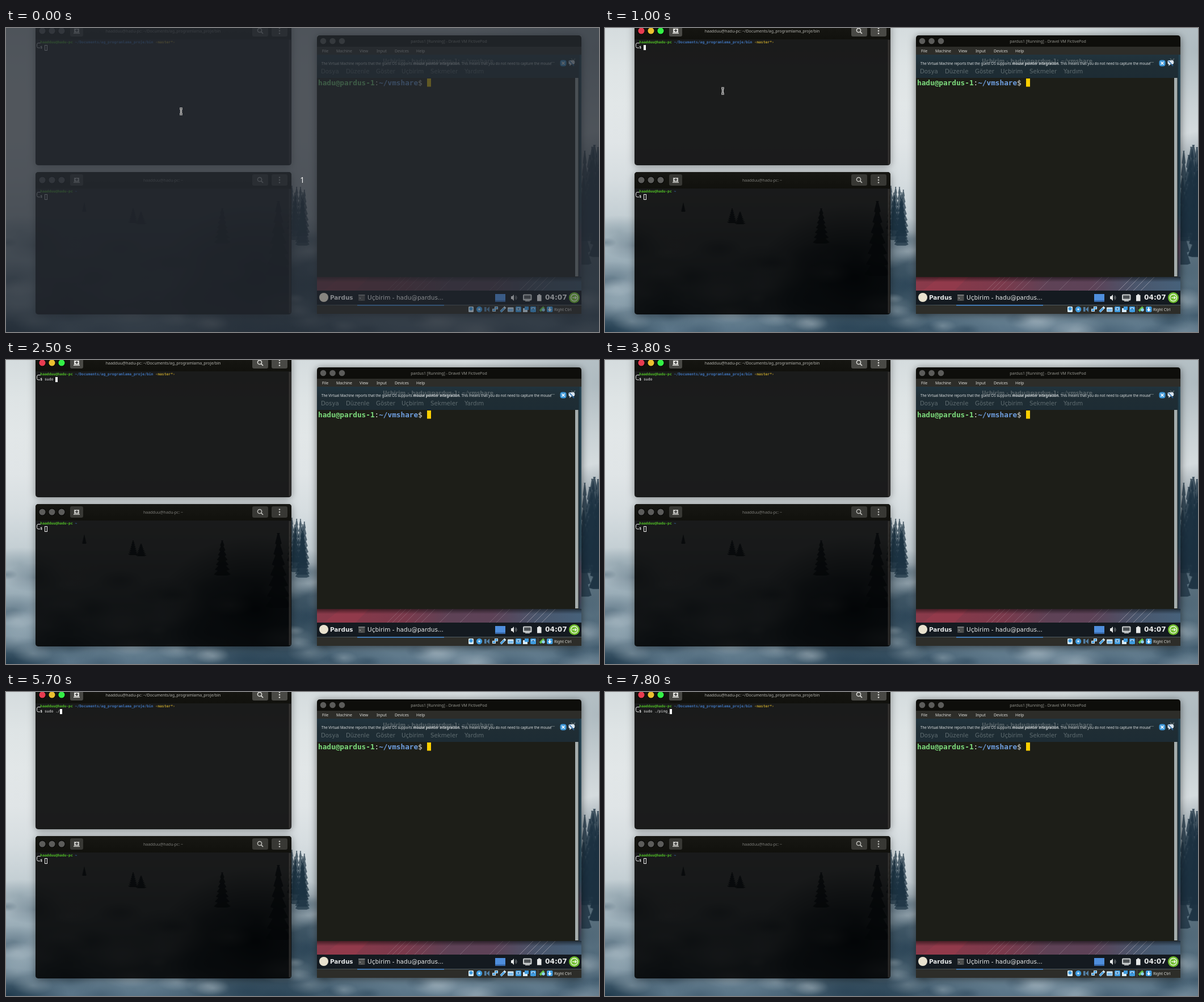
Animation, 1045 px wide and 536 px high, one loop 8000 ms. Source, as an HTML page with a canvas:

```html
<!DOCTYPE html>
<html lang="tr">
<head>
<meta charset="utf-8">
<title>Terminal session</title>
<style>
html, body { margin: 0; width: 100%; height: 100%; overflow: hidden; background: #24394a; }
canvas { display: block; }
</style>
</head>
<body>
<canvas id="stage" width="1045" height="536"></canvas>
<script>
const W = 1045, H = 536, LOOP = 8000;
const SANS = '"Noto Sans", sans-serif';
const GUEST = '"DejaVu Sans", sans-serif';
const MONO = '"DejaVu Sans Mono", monospace';
const CELL = 3.83, TERM_FONT = `${CELL / 0.602}px ${MONO}`;
const USER = 'haadduu@hadu-pc';

const stage = document.getElementById('stage').getContext('2d');
let g = stage;

function rect(x, y, w, h, fill) {
  g.fillStyle = fill;
  g.fillRect(x, y, w, h);
}

function round(x, y, w, h, r, fill) {
  g.beginPath();
  g.roundRect(x, y, w, h, r);
  g.fillStyle = fill;
  g.fill();
}

function disc(x, y, r, fill) {
  g.beginPath();
  g.arc(x, y, r, 0, 7);
  g.fillStyle = fill;
  g.fill();
}

function line(points, color, width = 1) {
  g.beginPath();
  points.forEach(([x, y]) => g.lineTo(x, y));
  g.strokeStyle = color;
  g.lineWidth = width;
  g.stroke();
}

function poly(points, fill) {
  g.beginPath();
  points.forEach(([x, y]) => g.lineTo(x, y));
  g.fillStyle = fill;
  g.fill();
}

// Writes text and returns the x where it ends.
function text(s, x, y, font, fill, align = 'left') {
  g.font = font;
  g.fillStyle = fill;
  g.textAlign = align;
  g.fillText(s, x, y);
  return x + g.measureText(s).width;
}

function gradient(x0, y0, x1, y1, ...colors) {
  const grad = g.createLinearGradient(x0, y0, x1, y1);
  colors.forEach((c, i) => grad.addColorStop(i / (colors.length - 1), c));
  return grad;
}

function blob(x, y, rx, ry, rgb, a) {
  g.save();
  g.translate(x, y);
  g.scale(rx, ry);
  const grad = g.createRadialGradient(0, 0, 0, 0, 0, 1);
  grad.addColorStop(0, `rgba(${rgb},${a})`);
  grad.addColorStop(1, `rgba(${rgb},0)`);
  rect(-1, -1, 2, 2, grad);
  g.restore();
}

function tree(x, top, h, w, fill) {
  const side = [];
  for (let i = 0; i <= 7; i++) {
    const y = top + h * i / 7, half = w * (i + 1) / 16;
    side.push([half, y], [half * 0.6, y + 2]);
  }
  poly([[x, top], ...side.map(([d, y]) => [x + d, y]),
    ...side.reverse().map(([d, y]) => [x - d, y])], fill);
}

// Shadow only outside the window, so translucent glass stays clear.
function shadow(x, y, w, h, r, strength) {
  g.save();
  g.beginPath();
  g.rect(0, 0, W, H);
  g.roundRect(x, y, w, h, r);
  g.clip('evenodd');
  g.shadowColor = `rgba(0,0,0,${strength})`;
  g.shadowBlur = 14;
  g.shadowOffsetY = 2;
  round(x, y, w, h, r, '#000');
  g.restore();
}

function landscape() {
  rect(0, 0, W, H, gradient(0, 0, 0, H, '#d5dcde', '#dee4e5', '#e2e7e8', '#e0e5e7',
    '#d6dde0', '#c3ced3', '#9fb1bb', '#7d94a2', '#587386'));
  blob(1045, 40, 240, 190, '130,148,158', 0.5);
  blob(1065, 330, 150, 150, '24,48,64', 1);
  blob(1045, 470, 120, 100, '62,88,106', 0.7);
  blob(440, 440, 170, 130, '14,34,48', 0.95);
  blob(530, 450, 60, 90, '40,66,84', 0.7);
  blob(25, 360, 70, 30, '120,142,154', 0.5);
  blob(0, 536, 110, 50, '24,50,68', 0.9);
  blob(470, 536, 230, 46, '34,60,78', 0.75);
  // drifting mist over the valley
  let seed = 11;
  const random = () => (seed = seed * 16807 % 2147483647) / 2147483647;
  for (let i = 0; i < 110; i++) {
    const x = random() * W, y = 375 + random() * 165, r = 12 + random() * 30;
    blob(x, y, r * 1.5, r * 0.7, i % 2 ? '205,217,223' : '34,60,80', 0.28);
  }
  for (let i = 0; i < 9; i++) {
    tree(1016 + random() * 32, 205 + random() * 70, 150, 26 + random() * 16, 'rgba(27,49,65,.75)');
    tree(502 + random() * 26, 278 + random() * 30, 75, 16 + random() * 12, 'rgba(28,50,66,.7)');
  }
  [[480, 305, 130, 46], [381, 318, 60, 30], [224, 318, 24, 18], [238, 324, 20, 20], [138, 308, 14, 9]]
    .forEach(([x, y, h, w]) => tree(x, y, h, w, 'rgba(25,43,56,.75)'));
}

function terminalFrame(y) {
  shadow(52, y, 451, 251, 5, 0.4);
  round(52, y, 451, 251, 5, 'rgba(0,0,0,.88)');
  round(52, y, 451, 29, [5, 5, 0, 0], gradient(0, y, 0, y + 29, '#171713', '#11110d'));
  rect(498.5, y + 30, 3.5, 219, 'rgba(74,70,66,.5)');
}

function terminalHeader(y, title, active) {
  const cy = y + 14;
  const face = active ? '#494945' : '#383834', ink = active ? '#dededa' : '#c0c0bc';
  const lights = active ? ['#e83c50', '#ecc030', '#34f046'] : ['#5c5c5a', '#5c5c5a', '#5c5c5a'];
  lights.forEach((c, i) => {
    disc(64 + 17 * i, cy, 6.6, '#050505');
    disc(64 + 17 * i, cy, 5.6, c);
  });
  text(title, 277, cy + 2.5, '7px ' + SANS, active ? '#b2b2ad' : '#7c7c78', 'center');

  round(113, cy - 10, 23, 20, 3, face);
  round(434, cy - 10, 28, 20, 3, face);
  round(468, cy - 10, 28, 20, 3, face);
  // new tab, search and menu
  rect(120, cy - 4, 9, 7, ink);
  rect(119, cy + 3.5, 11, 1.5, ink);
  rect(124, cy - 3, 1.4, 5, '#333');
  rect(122, cy - 1.2, 5, 1.4, '#333');
  g.beginPath();
  g.arc(447, cy - 1, 3.6, 0, 7);
  g.strokeStyle = ink;
  g.lineWidth = 1.5;
  g.stroke();
  line([[449.6, cy + 1.6], [453, cy + 5]], ink, 1.7);
  [-4.5, 0, 4.5].forEach(d => disc(482, cy + d, 1.3, ink));
}

function terminalPrompt(y, path, branch, typed, active, lit) {
  const base = y + 36.3, left = 68 - 2 * CELL, bold = 'bold ' + TERM_FONT;
  g.beginPath();
  g.moveTo(61, y + 35.5);
  g.lineTo(57, y + 35.5);
  g.quadraticCurveTo(54.5, y + 35.5, 54.5, y + 38);
  g.lineTo(54.5, y + 41.5);
  g.quadraticCurveTo(54.5, y + 44, 57, y + 44);
  g.lineTo(60, y + 44);
  g.strokeStyle = '#e4e4e4';
  g.lineWidth = 1;
  g.stroke();
  text(USER, left, base, bold, '#50bd26');
  text(path, left + CELL * 16, base, bold, '#3f73b8');
  text(branch, left + CELL * (17 + path.length), base, bold, '#b89a2a');
  text('$', left, base + 9, bold, '#eee');
  text(typed, 68, base + 9, TERM_FONT, '#f2f2f2');

  const cx = 68 + Math.round(typed.length * CELL);
  if (!active) {
    g.strokeStyle = '#eee';
    g.strokeRect(cx + 0.5, y + 39.5, 4, 9);
  } else if (lit) {
    rect(cx, y + 39, 4, 9, '#fff');
  }
}

function guestDesktop() {
  rect(548, 47, 466, 416, gradient(548, 47, 548, 463, '#2b4d5e', '#2c4a59', '#344f60'));
  rect(548, 439, 466, 24, gradient(548, 0, 1014, 0, '#8a3a4a', '#84394a', '#7a3a4c',
    '#5e4256', '#5d4257', '#4a566c', '#46617a'));
  rect(1009, 330, 5, 110, gradient(0, 330, 0, 440, '#2f4c5c', '#5a4456', '#3c5064'));
  poly([[590, 439], [640, 439], [616, 463], [560, 463]], 'rgba(190,60,80,.2)');
  g.save();
  g.beginPath();
  g.rect(548, 439, 466, 24);
  g.clip();
  for (const x of [672, 681, 690, 704, 720, 732, 764, 800, 852, 864, 905, 918, 931, 944]) {
    line([[x, 463], [x + 24, 439]], `rgba(220,210,220,${x > 890 ? 0.45 : 0.22})`);
  }
  g.restore();
  rect(548, 439, 466, 9, gradient(0, 439, 0, 448, 'rgba(0,0,0,.5)', 'rgba(0,0,0,0)'));
  rect(1009, 47, 5, 392, gradient(1009, 0, 1014, 0, 'rgba(0,0,0,.4)', 'rgba(0,0,0,0)'));
  rect(548, 47, 461, 41, gradient(0, 47, 0, 88, '#21343e', '#1f2d34', '#1d2c34'));
  rect(548, 88, 461, 351, '#1d1e18');
  rect(1003, 88, 5.5, 350, '#a5adad');
}

function guestWindow() {
  const dim = '#5f6c70';
  text('Uçbirim - hadu@pardus-1: ~/vmshare', 761.5, 61, 'bold 9.26px ' + GUEST, '#566267', 'center');
  [['Dosya', 555], ['Düzenle', 599], ['Göster', 652], ['Uçbirim', 697], ['Sekmeler', 748], ['Yardım', 808]]
    .forEach(([s, x]) => text(s, x, 80.3, '10.2px ' + GUEST, dim));
  line([[960, 60.5], [967, 60.5]], dim);
  line([[996, 54], [1003, 61]], dim, 1.4);
  line([[1003, 54], [996, 61]], dim, 1.4);

  const note = '6.18px ' + SANS, ink = '#dde1e2';
  let x = text('The Virtual Machine reports that the guest OS supports ', 556, 64.8, note, ink);
  x = text('mouse pointer integration', x, 64.8, 'bold ' + note, ink);
  text('. This means that you do not need to capture the mouse', x, 64.8, note, ink);
  round(976.5, 56.5, 11, 11, 4, '#3d97d8');
  line([[979.5, 59.5], [984.5, 64.5]], '#fff', 1.5);
  line([[984.5, 59.5], [979.5, 64.5]], '#fff', 1.5);
  round(991.5, 57, 10.5, 7, 2, '#d9e4ee');
  poly([[994, 63], [998, 63], [993, 67]], '#d9e4ee');
  line([[993, 58], [1001, 67]], '#2d6fae', 1.5);

  const font = `bold ${7.66 / 0.602}px ${MONO}`;
  x = text('hadu@pardus-1', 550, 100.7, font, '#7ddc7d');
  x = text(':', x, 100.7, `12.72px ${MONO}`, '#e0e0da');
  x = text('~/vmshare', x, 100.7, font, '#6f9fe0');
  text('$', x, 100.7, `12.72px ${MONO}`, '#e0e0da');
  rect(742, 89, 7, 14.5, '#fdd000');
}

function taskbar() {
  const ink = '#e6e8e8';
  rect(548, 463, 466, 25, '#141a20');
  disc(560, 475, 8, '#e9e2cf');
  text('Pardus', 571, 478.8, 'bold 10.4px ' + GUEST, ink);
  round(621, 470, 11.5, 11, 1, '#4b4d4d');
  rect(621, 470, 11.5, 2, '#77797a');
  text('>_', 622.5, 477.5, `5px ${MONO}`, ink);
  text('Uçbirim - hadu@pardus...', 637, 478.8, '10.5px ' + GUEST, ink);
  rect(862, 469, 18, 13.5, '#4f8edc');
  rect(862, 480, 18, 2.5, '#3a6fb4');
  poly([[890, 473], [892, 473], [895, 470], [895, 481], [892, 478], [890, 478]], ink);
  [3, 5].forEach(r => {
    g.beginPath();
    g.arc(895, 475.5, r, -0.9, 0.9);
    g.strokeStyle = '#8b9092';
    g.lineWidth = 1;
    g.stroke();
  });
  round(911, 469.5, 15.5, 11, 2, '#c9cdce');
  rect(913, 471.5, 11.5, 6, '#4c5154');
  rect(915, 480.5, 8, 1.5, '#c9cdce');
  rect(936, 471, 7.5, 10.5, ink);
  rect(938, 469.5, 3.5, 2, ink);
  text('04:07', 950, 479.4, 'bold 12.2px ' + GUEST, ink);
  disc(1001.5, 475.5, 9.5, '#6fbd2e');
  g.beginPath();
  g.arc(1001.5, 475.5, 6, 0, 7);
  g.strokeStyle = '#eef6e4';
  g.lineWidth = 1.4;
  g.stroke();
  line([[998, 475.5], [1005, 475.5]], '#eef6e4', 1.4);
  line([[1002.5, 473], [1005, 475.5], [1002.5, 478]], '#eef6e4', 1.4);
}

function statusBar() {
  const blue = '#3f9bdf', pale = '#d8ebf8';
  const boxed = x => {
    round(x - 5, 491, 10, 10, 1.5, blue);
    rect(x - 3, 493, 6, 4.5, pale);
    rect(x - 2, 494, 4, 2.5, '#2c72b0');
  };
  rect(548, 488.5, 466, 15.5, '#2d2d29');
  rect(619, 488, 153, 1.5, '#4b93e0');
  round(815, 491, 9, 10, 1.5, pale);
  disc(819.5, 495, 3, blue);
  disc(834, 496, 5.2, blue);
  disc(834, 496, 1.8, pale);
  rect(843, 492, 3.5, 8, '#537fa4');
  poly([[847, 496], [852, 491], [852, 501]], '#537fa4');
  [[857, 495], [861, 491]].forEach(([x, y]) => {
    rect(x, y, 6, 5, pale);
    rect(x + 1, y + 1, 4, 3, blue);
  });
  line([[872, 500], [880, 492]], pale, 4);
  line([[871.5, 500.5], [878, 494]], blue, 2.5);
  round(884, 492.5, 10.5, 8, 1, pale);
  rect(885, 495, 8.5, 4.5, '#7dbcec');
  [903, 929].forEach(boxed);
  rect(911, 494, 8, 7, pale);
  rect(914, 491, 7, 6, blue);
  poly([[925, 496], [933, 496], [929, 502]], blue);
  rect(937, 490, 1, 12, '#55554f');
  line([[941, 499], [948, 492]], '#62c04a', 4);
  disc(947, 497, 2.8, '#8fd0f2');
  round(953, 491, 10.5, 10, 2, blue);
  poly([[955, 496], [961.5, 496], [958.2, 500]], '#fff');
  rect(957.2, 492.5, 2, 4, '#fff');
  text('Right Ctrl', 966, 498.6, '6.9px ' + SANS, '#dcdcd8');
}

function virtualMachine() {
  shadow(548, 13, 466, 491, [5, 5, 0, 0], 0.55);
  round(548, 13, 466, 21, [5, 5, 0, 0], '#0e0e0b');
  [559, 575.5, 592].forEach(x => disc(x, 23, 5.3, '#5c5c5a'));
  text('pardus1 [Running] - Dravel VM FictivePod', 780.5, 25.5, '6.95px ' + SANS, '#96968f', 'center');
  rect(548, 33, 466, 14.5, '#2d2d29');
  [['File', 557], ['Machine', 582], ['View', 623], ['Input', 653], ['Devices', 685], ['Help', 723]]
    .forEach(([s, x]) => text(s, x, 42.7, '7px ' + SANS, '#dcdcd8'));
  guestDesktop();
  guestWindow();
  taskbar();
  statusBar();
}

function pointer(x, y) {
  for (const [color, width] of [['#f4f4f4', 3], ['#222', 1]]) {
    line([[x - 2.5, y - 5], [x + 2.5, y - 5]], color, width);
    line([[x - 2.5, y + 5], [x + 2.5, y + 5]], color, width);
    line([[x, y - 5], [x, y + 5]], color, width);
  }
}

function dimAll() {
  const far = 'rgba(38,43,51,.77)';
  rect(0, 0, 548, H, far);
  rect(1014, 0, 31, H, far);
  rect(548, 0, 466, 13, far);
  rect(548, 504, 466, 32, far);
  rect(548, 13, 466, 450, 'rgba(38,43,51,.72)');
  rect(548, 463, 466, 41, 'rgba(38,43,51,.5)');
}

const KEYS = [[1600, 's'], [1700, 'su'], [1800, 'sudo'], [2500, 'sudo '],
  [4400, 'sudo .'], [5000, 'sudo ./'], [6600, 'sudo ./ping_']];
const BLINKS = [2600, 3200, 3800, 4200, 5100, 5700, 6300, 6600, 7200, 7800];

const backdrop = document.createElement('canvas');
backdrop.width = W;
backdrop.height = H;

function paintBackdrop() {
  g = backdrop.getContext('2d');
  landscape();
  terminalFrame(-9);
  terminalFrame(254);
  virtualMachine();
  g = stage;
}

function render(t) {
  const active = t >= 900;
  const typed = KEYS.reduce((s, [at, v]) => t >= at ? v : s, '');
  const lit = BLINKS.filter(at => at <= t).length % 2 === 0;
  const dir = '~/Documents/ag_programlama_proje/bin';

  g.drawImage(backdrop, 0, 0);
  terminalHeader(-9, `${USER}: ${dir}`, active);
  terminalPrompt(-9, dir, '‹master*›', typed, active, lit);
  terminalHeader(254, `${USER}: ~`, false);
  terminalPrompt(254, '~', '', '', false, false);

  // drive and network activity
  if (t === 3200 || t === 4400) disc(822, 499, 2, '#5fd04a');
  if (t === 4400) disc(865, 499, 2, '#5fd04a');

  if (t < 400) {
    dimAll();
    text('1', 522, 273, '13.5px ' + SANS, '#f4f4f4', 'center');
  }
  if (t < 1400) {
    const p = Math.min(1, Math.max(0, (t - 400) / 500));
    const k = p * p * (3 - 2 * p);
    pointer(308.5 - 101 * k, 147 - 36 * k);
  }
}

let shown = -1;
function tick() {
  const t = Math.floor(performance.now() % LOOP / 100) * 100;
  if (t !== shown) render(shown = t);
  requestAnimationFrame(tick);
}

paintBackdrop();
tick();
</script>
</body>
</html>
```
